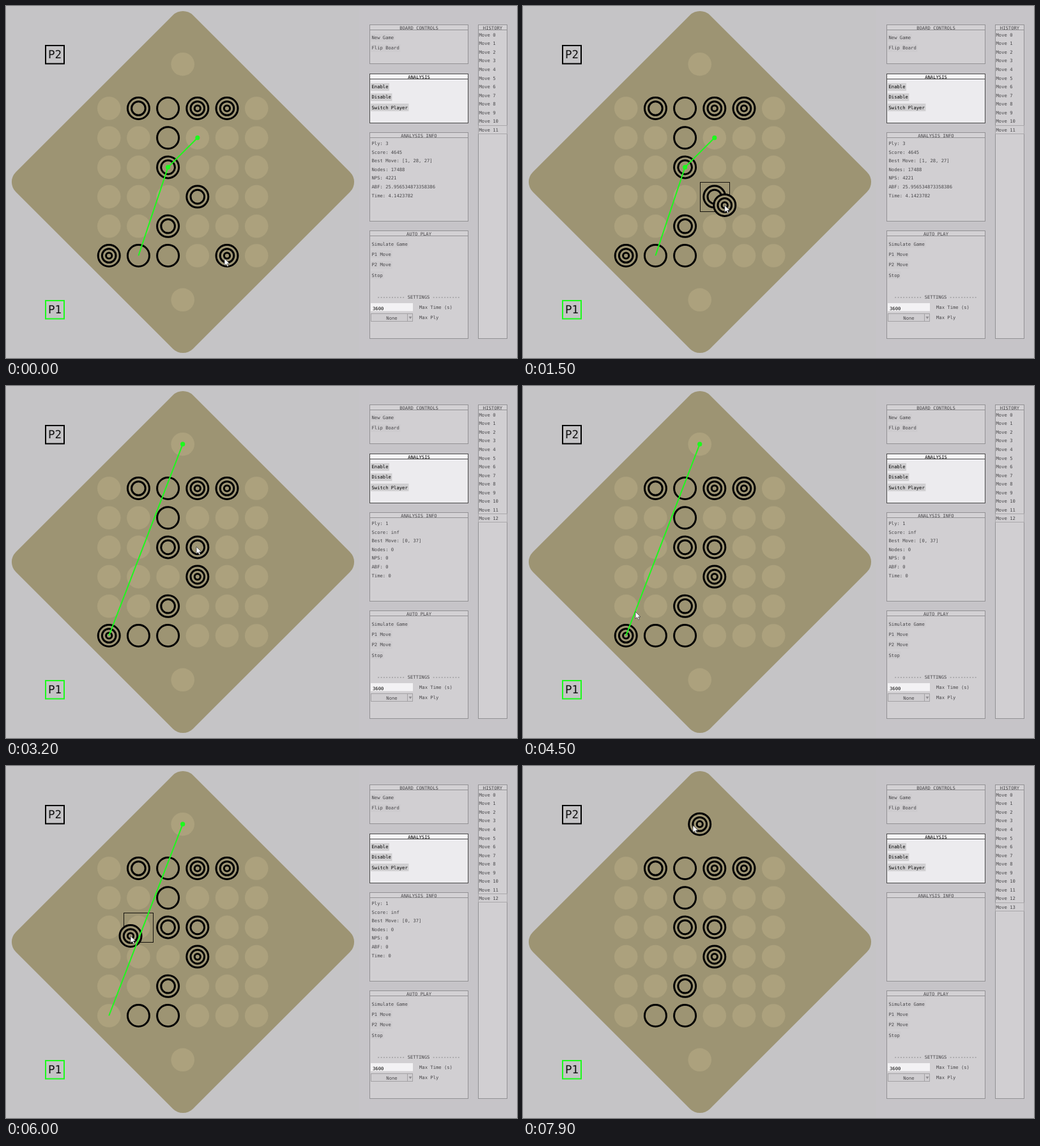
Recreate the animation shown at these times as an HTML page. Size 800 by 552 pixels, loop 8 s.

```html
<!DOCTYPE html>
<html lang="en">
<head>
<meta charset="utf-8">
<title>Board analysis</title>
<style>
  html, body { margin: 0; width: 100%; height: 100%; overflow: hidden; background: #c6c4c8; }
  svg { display: block; }
  text { font-family: "DejaVu Sans Mono", "Liberation Mono", monospace; font-size: 7.2px; fill: #48474a; white-space: pre; text-rendering: geometricPrecision; }
  .mid { text-anchor: middle; }
  .strong { fill: #000; }
  .player { font-size: 17.5px; fill: #111; text-anchor: middle; }
</style>
</head>
<body>
<svg id="stage" width="800" height="552" viewBox="0 0 800 552"></svg>
<script>
const LOOP = 8000, STEP = 100;
const BOARD = '#9d9473', CELL = '#aca17d', GREEN = '#1cfa1c';
const PANEL = '#d1cfd2', EDGE = '#929194';
const stage = document.getElementById('stage');

function add(tag, attrs, parent = stage) {
  const el = document.createElementNS('http://www.w3.org/2000/svg', tag);
  for (const key in attrs) el.setAttribute(key, attrs[key]);
  parent.appendChild(el);
  return el;
}
const show = (el, on) => el.setAttribute('visibility', on ? 'visible' : 'hidden');
const place = (el, [x, y]) => el.setAttribute('transform', `translate(${x} ${y})`);

function rect(x, y, width, height, fill, stroke = 'none') {
  return add('rect', { x, y, width, height, fill, stroke });
}
function label(str, x, y, cls = '', parent = stage) {
  const el = add('text', { x, y: y + 2.6, class: cls }, parent);
  el.textContent = str;
  return el;
}

// Board: a 6 x 6 grid with one extra cell above and below
const PITCH = 46.2;
const at = (i, j) => [161.2 + PITCH * i, 160.5 + PITCH * j];
const GOAL = at(2.5, -1.5), HOME = at(2.5, 6.5);
const LAYOUT = ['.2133.', '..1...', '..2...', '...2..', '..2...', '311.3.'];
const cells = [GOAL, HOME];
LAYOUT.forEach((_, j) => { for (let i = 0; i < 6; i++) cells.push(at(i, j)); });

function drawPlayer(name, y, stroke) {
  rect(62, y, 29, 28.5, 'none', stroke).setAttribute('stroke-width', 2);
  label(name, 76.5, y + 17.6, 'player');
}
function drawBoard() {
  rect(0, 0, 553, 552, '#c5c4c6');
  add('rect', { x: 81, y: 80, width: 392, height: 392, rx: 22, fill: BOARD, transform: 'rotate(45 277 276)' });
  cells.forEach(([cx, cy]) => add('circle', { cx, cy, r: 18.3, fill: CELL }));
  drawPlayer('P2', 62, '#000');
  drawPlayer('P1', 462, GREEN);
}

function piece(rings, pos) {
  const g = add('g', { fill: 'none', stroke: '#000', 'stroke-width': 3 });
  for (let k = 0; k < rings; k++) add('circle', { r: 17 - 6.2 * k, fill: k ? 'none' : BOARD }, g);
  place(g, pos);
  return g;
}

function panel(title, x, y, w, h, active) {
  const stroke = active ? '#4a4a4a' : EDGE;
  rect(x, y, w, h, active ? '#ecebee' : PANEL, stroke);
  rect(x, y, w, 8, active ? '#f6f5f7' : '#d3d1d4', stroke);
  label(title, x + w / 2, y + 4.4, active ? 'mid strong' : 'mid');
}
function buttons(names, y, active) {
  names.forEach((str, i) => {
    const cy = y + 16.3 * i;
    rect(571, Math.round(cy - 6), 3 + str.length * 4.34, 12, active ? '#d0cfd1' : '#cdcbce');
    label(str, 572.5, cy, active ? 'strong' : '');
  });
}

function drawPanels() {
  panel('BOARD CONTROLS', 569.5, 29.5, 154, 61);
  panel('ANALYSIS', 569.5, 106.5, 154, 77, true);
  panel('ANALYSIS INFO', 569.5, 198.5, 154, 139);
  panel('AUTO PLAY', 569.5, 352.5, 154, 169);
  panel('HISTORY', 739.5, 29.5, 45, 492);
  buttons(['New Game', 'Flip Board'], 49.5);
  buttons(['Enable', 'Disable', 'Switch Player'], 126.5, true);
  buttons(['Simulate Game', 'P1 Move', 'P2 Move', 'Stop'], 373);
  const dash = '-'.repeat(10);
  label(`${dash} SETTINGS ${dash}`, 646, 456, 'mid');
  rect(571, 466, 66, 12.5, '#f3f2f4');
  label('3600', 574, 474, 'strong');
  label('Max Time (s)', 647, 472.5);
  rect(571.5, 482.5, 65, 12, '#cfcdd0', '#a3a1a4');
  add('path', { d: 'M628.5 482.5v12', stroke: '#a3a1a4' });
  add('path', { d: 'M630.5 487h5l-2.5 4z', fill: '#929094' });
  label('None', 604, 489, 'mid');
  label('Max Ply', 647, 488.5);
}

const FIELDS = ['Ply', 'Score', 'Best Move', 'Nodes', 'NPS', 'ABF', 'Time'];
function analysis(values, path) {
  const g = add('g', {});
  FIELDS.forEach((f, i) => label(`${f}: ${values[i]}`, 572.5, 215.3 + 13.6 * i, '', g));
  add('polyline', { points: path.join(' '), fill: 'none', stroke: GREEN, 'stroke-width': 2 }, g);
  path.slice(1).forEach(([cx, cy]) => add('circle', { cx, cy, r: 3.6, fill: GREEN }, g));
  return g;
}

drawBoard();
drawPanels();
const moveY = i => 45.2 + 13.55 * i;
const moves = Array.from({ length: 14 }, (_, i) => label('Move ' + i, 740.5, moveY(i)));
const current = rect(739.5, 0, 45, 13, 'none', '#aaa8ab');
const hover = rect(0, 0, 46, 46, 'none', '#16140f');

const pieces = {};
LAYOUT.forEach((line, j) => [...line].forEach((n, i) => {
  if (n !== '.') pieces[[i, j]] = piece(+n, at(i, j));
}));
const drag = (i, j, to, start, end) => ({ el: pieces[[i, j]], from: at(i, j), to, start, end });
const drags = [
  drag(4, 5, at(3, 3), 700, 1800),
  drag(3, 3, at(3, 2), 1800, 3000),
  drag(0, 5, GOAL, 5300, 7100)
];
const first = analysis([3, 4645, '[1, 28, 27]', 17488, 4221, '25.956534873358386', '4.1423782'],
  [at(1, 5), at(2, 2), at(3, 1)]);
const second = analysis([1, 'inf', '[0, 37]', 0, 0, 0, 0], [at(0, 5), GOAL]);
const cursor = add('path', {
  d: 'M0 0V11L2.6 8.7L4.5 12.6L6.3 11.8L4.5 8H8Z', fill: '#fff', stroke: '#333', 'stroke-width': 0.7
});

// Turning points of the pointer: time, x, y
const track = [
  [0, 342, 396], [600, 342, 396], [900, 333, 346.5], [1700, 310, 301], [2200, 306, 299],
  [2300, 305, 288], [2500, 300, 254], [2700, 298, 252], [3900, 298, 252], [4500, 176, 354],
  [5100, 154, 398], [5300, 153, 399], [6000, 195, 266.5], [6800, 264.5, 91.5],
  [7700, 264.5, 91.5], [7900, 266, 93], [LOOP, 266, 93]
];
function pointer(t) {
  const n = track.findIndex(k => k[0] > t);
  const [t0, x0, y0] = track[n - 1], [t1, x1, y1] = track[n];
  const f = (t - t0) / (t1 - t0);
  return [x0 + (x1 - x0) * f, y0 + (y1 - y0) * f];
}
const near = (a, b) => Math.abs(a - b) < PITCH / 2;
const cellAt = ([x, y]) => cells.find(c => near(c[0], x) && near(c[1], y));

function render(t) {
  const pos = pointer(t);
  place(cursor, pos);
  let held = false;
  for (const d of drags) {
    const active = t >= d.start && t < d.end;
    held = held || active;
    place(d.el, active ? pos : t < d.start ? d.from : d.to);
  }
  // the square runs slightly ahead of the held piece
  const cell = held && cellAt(pointer(t + STEP));
  show(hover, cell);
  if (cell) {
    place(hover, cell.map(v => Math.round(v - PITCH / 2) + 0.5));
    hover.setAttribute('stroke-opacity', cell === GOAL ? 0.6 : 1);
  }
  const last = t < 3000 ? 11 : t < 7100 ? 12 : 13;
  moves.forEach((m, i) => show(m, i <= last));
  current.setAttribute('y', Math.round(moveY(last) - 6.5) - 0.5);
  show(first, t < 3000);
  show(second, t >= 3100 && t < 7100);
}

const begin = performance.now();
function tick() {
  const t = (performance.now() - begin) % LOOP;
  render(Math.floor(t / STEP) * STEP);
  requestAnimationFrame(tick);
}
tick();
</script>
</body>
</html>
```
